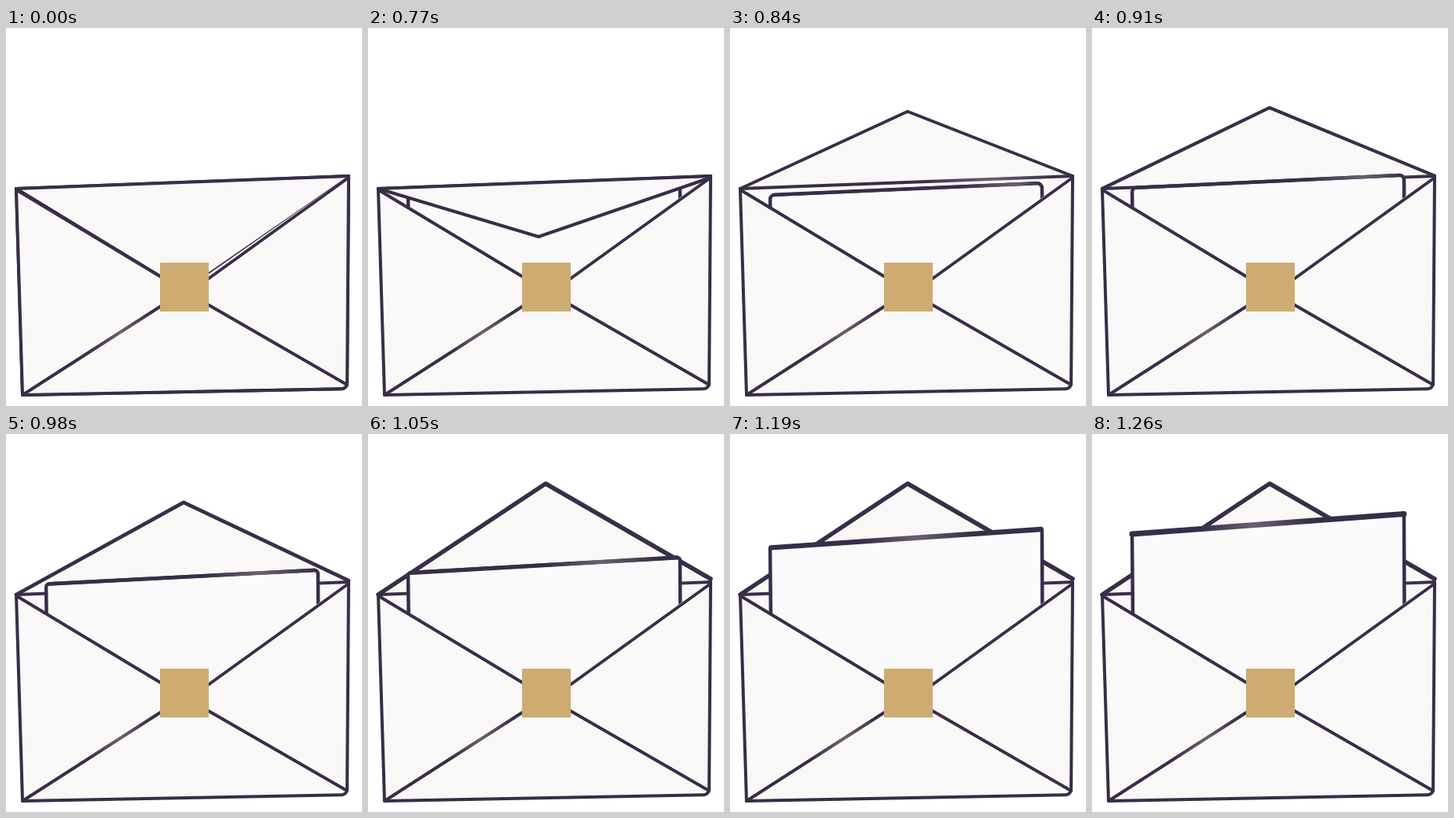
An HTML page with a canvas that plays this animation: 453 px wide and 480 px high, repeating every 2.73 s.

```html
<!DOCTYPE html>
<html lang="en">
<head>
<meta charset="utf-8">
<title>Opening envelope</title>
<style>
  html, body { margin: 0; height: 100%; overflow: hidden; background: #fff; }
  canvas { display: block; }
</style>
</head>
<body>
<canvas id="stage" width="453" height="480"></canvas>
<script>
const ctx = document.getElementById('stage').getContext('2d');
const INK = '#372e49', GLINT = '#69616f', CREAM = '#faf8f6', PAPER = '#fafafb', SEAL = '#cdab73';
const LOOP = 2730, START = 770, STEP = 70, LAST = 8, OPEN = 2;

// Envelope corners, clockwise, and the point where the folds meet
const A = [13, 204], B = [436, 188], C = [434, 454], D = [21, 466];
const MIDDLE = [227, 334];

const lerp = (a, b, t) => a + (b - a) * t;
const clamp = t => Math.max(0, Math.min(1, t));

function trace(...points) {
  ctx.beginPath();
  points.forEach(p => ctx.lineTo(...p));
}

function fill(color, ...points) {
  trace(...points);
  ctx.fillStyle = color;
  ctx.fill();
}

function stroke(width, color = INK) {
  ctx.lineWidth = width;
  ctx.strokeStyle = color;
  ctx.stroke();
}

function line(width, color, ...points) {
  trace(...points);
  stroke(width, color);
}

// Ink with a soft glint centred at a fraction of the way along x
function sheen(x1, x2, at) {
  const ink = ctx.createLinearGradient(x1, 0, x2, 0);
  ink.addColorStop(clamp(at - .2), INK);
  ink.addColorStop(at, GLINT);
  ink.addColorStop(clamp(at + .2), INK);
  return ink;
}

function drawFlap(tip, width, hingeRight) {
  const edge = [A, tip, [B[0], hingeRight]];
  fill(CREAM, ...edge);
  line(width, INK, ...edge);
}

function drawLetter(rise) {
  const left = lerp(212, 127, rise), right = lerp(197, 101.5, rise);
  const corner = 6 * (1 - rise);
  ctx.beginPath();
  ctx.moveTo(53, 340);
  ctx.arcTo(51, left, 397, right, corner);
  ctx.arcTo(397, right, 398, 340, corner);
  ctx.lineTo(398, 340);
  ctx.fillStyle = PAPER;
  ctx.fill();
  stroke(4.5);
  line(lerp(4, 7, rise), sheen(51, 397, lerp(.9, .45, rise)),
       [51 + corner, left], [397 - corner, right]);
}

function drawPocket() {
  fill(CREAM, A, MIDDLE, B, C, D);
  line(4, INK, [14, 206], MIDDLE);
  line(4, INK, [436, 190], [258, 318], MIDDLE);
  line(4, sheen(22, 227, .6), D, MIDDLE);
  line(4, INK, [434, 453], MIDDLE);

  ctx.beginPath();
  ctx.moveTo(...A);
  ctx.lineTo(...D);
  ctx.arcTo(434, 458, ...B, 7);
  ctx.lineTo(...B);
  stroke(4);
}

function draw(step) {
  const unfold = clamp((step - OPEN) / 3) ** 2;
  const rise = clamp((step - OPEN) / (LAST - OPEN)) ** 1.25;
  ctx.clearRect(0, 0, 453, 480);
  ctx.lineCap = ctx.lineJoin = 'round';

  fill(CREAM, A, B, C, D);
  if (step >= OPEN) drawFlap([226, lerp(106, 63, unfold)], lerp(4, 5.5, unfold), lerp(188, 184, unfold));
  line(4, sheen(A[0], B[0], .75), A, B);
  if (step > 0) drawLetter(rise);
  drawPocket();
  if (step < OPEN) {
    drawFlap(step ? [217, 265] : MIDDLE, 4, 190);
    line(4, INK, A, B);
    if (!step) drawPocket();
  }

  ctx.fillStyle = SEAL;
  ctx.fillRect(196, 298, 62, 62);
}

// The closed envelope has its flap lying exactly on the pocket folds
function drawClosed() {
  ctx.clearRect(0, 0, 453, 480);
}

function tick(now) {
  const t = now % LOOP;
  draw(t < START ? 0 : Math.min(LAST, 1 + Math.floor((t - START) / STEP)));
  requestAnimationFrame(tick);
}
tick(0);
</script>
</body>
</html>
```
